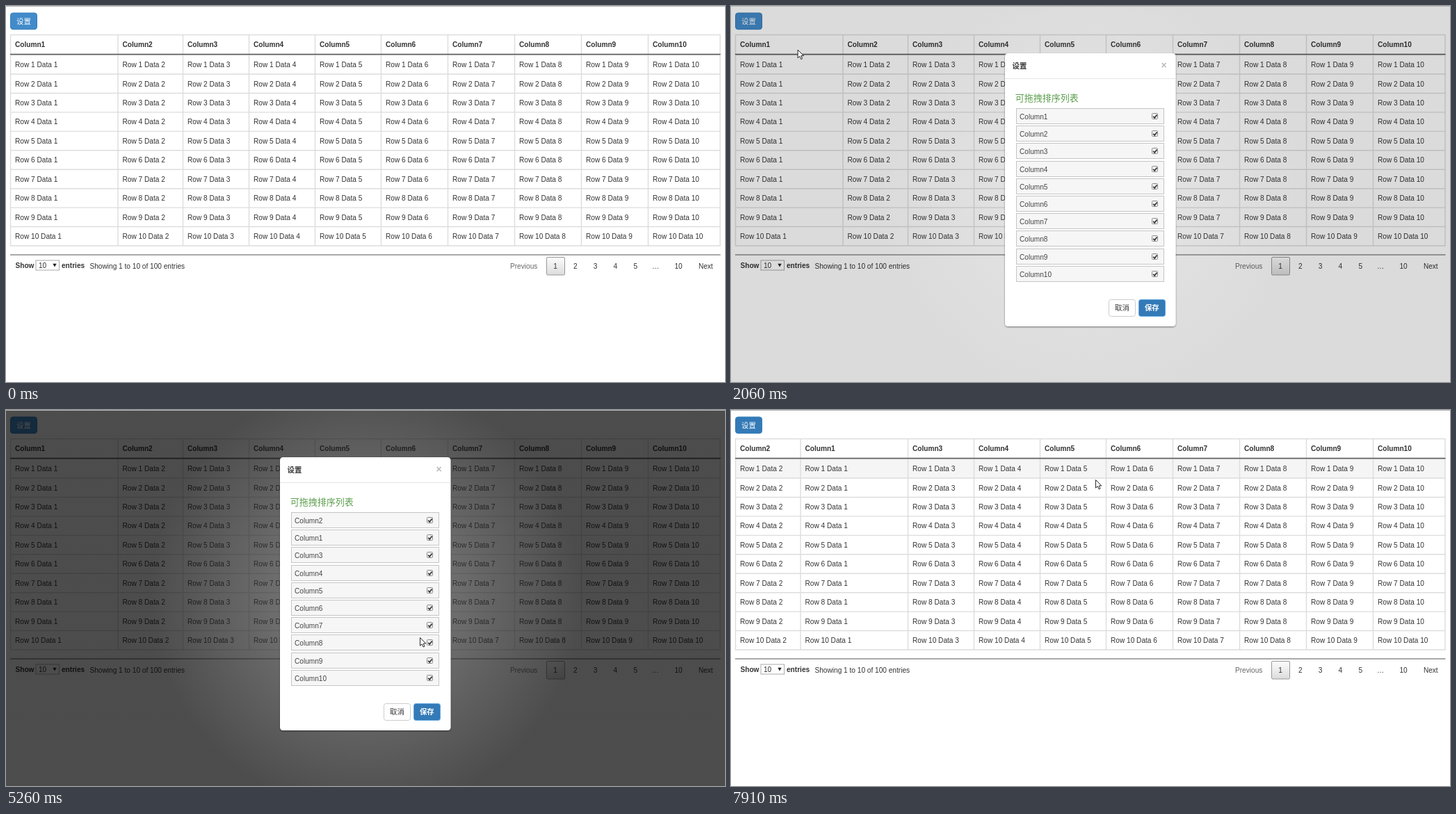
Write an HTML page that moves like this. It is 1034x541 px and loops after 7990 ms.

```html
<!DOCTYPE html>
<html lang="zh">
<head>
<meta charset="utf-8">
<title>Column settings</title>
<style>
html, body { margin: 0; width: 100%; height: 100%; overflow: hidden; background: #fff; }
svg { display: block; width: 1034px; height: 541px; }
text { font: 10.12px "Liberation Sans", Arial, "Noto Sans CJK SC", "Noto Sans CJK", sans-serif; fill: #333; white-space: pre; }
.bold { font-weight: bold; }
.mid { text-anchor: middle; }
.white { fill: #fff; }
.han { font-size: 10.4px; }
.list { font-size: 13px; fill: #5b9e4d; }
.url { font: 11px "Open Sans", "Noto Sans CJK SC", "Noto Sans CJK", sans-serif; }
.small { font-size: 9.4px; }
</style>
</head>
<body>
<svg id="stage" viewBox="0 0 1034 541">
  <defs>
    <radialGradient id="glow" gradientUnits="userSpaceOnUse" cx="517" cy="268" r="310">
      <stop offset=".38" stop-color="rgb(50,50,50)" stop-opacity=".7"/>
      <stop offset="1" stop-color="#000" stop-opacity=".7"/>
    </radialGradient>
    <linearGradient id="pageFill" x2="0" y2="1">
      <stop stop-color="#fcfcfc"/><stop offset="1" stop-color="#dcdcdc"/>
    </linearGradient>
    <filter id="shadow" x="-10%" y="-10%" width="120%" height="125%">
      <feDropShadow dx="0" dy="1" stdDeviation="1.3" flood-opacity=".5"/>
    </filter>
  </defs>
</svg>
<script>
const LOOP = 7990, STEP = 78;
const COLUMNS = Array.from({ length: 10 }, (_, i) => i + 1);
const SWAPPED = [2, 1, ...COLUMNS.slice(2)];
const PITCH = 25.2, ROW = 27.44, LEFT = 6.5, RIGHT = 1027;
const stage = document.getElementById('stage');

// Pointer moves: start, end, x, y
const ENTRY = [811, 539];
const MOVES = [
  [270, 582, 84, 178], [820, 820, 80, 64], [898, 1520, 41, 23],
  [2060, 2370, 314, 221], [2600, 2990, 543, 169], [3140, 3460, 502, 159],
  [3610, 4150, 487, 187], [4700, 5253, 595, 327], [5330, 5490, 588, 413],
  [5580, 5870, 601, 441], [6060, 6294, 615, 426], [6660, 7290, 645, 64],
  [7753, 7910, 524, 100]
];
const DRAG_START = 3610, DROP = 4530, GRAB_Y = 159, SAVED = 7820;

const text = (x, y, s, cls = '', extra = '') =>
  `<text x="${x}" y="${y}" class="${cls}" ${extra}>${s}</text>`;
const box = (x, y, w, h, fill, stroke = 'none', r = 0, extra = '') =>
  `<rect x="${x}" y="${y}" width="${w}" height="${h}" rx="${r}" fill="${fill}" stroke="${stroke}" ${extra}/>`;
const line = (x1, y1, x2, y2, color = '#ddd', w = 1.4) =>
  `<path d="M${x1} ${y1}L${x2} ${y2}" stroke="${color}" stroke-width="${w}"/>`;
const across = (y, color, w) => line(6, y, 1027.5, y, color, w);

function add(markup) {
  const g = document.createElementNS('http://www.w3.org/2000/svg', 'g');
  g.innerHTML = markup;
  stage.append(g);
  return g;
}
const show = (node, on) => { node.style.display = on ? '' : 'none'; };
const part = (g, cls) => g.querySelector('.' + cls);

const columnWidth = n => n === 1 ? 154.5 : n === 2 ? 93.5 : n < 6 ? 95 : 96;

function table(order) {
  let s = box(LEFT, 71, RIGHT - LEFT, 26.7, '#f5f5f5', 'none', 0, 'class="hover"') + across(41.5);
  for (let r = 0; r <= 10; r++) s += across(70.6 + r * ROW);
  let x = LEFT;
  for (const c of order) {
    s += line(x, 41, x, 345) + text(x + 6.5, 58.7, 'Column' + c, 'bold');
    for (let r = 1; r <= 10; r++) s += text(x + 6.5, 60.7 + r * ROW, `Row ${r} Data ${c}`);
    x += columnWidth(c);
  }
  return s + line(RIGHT, 41, RIGHT, 345) + across(69.5, '#555', 1.3);
}

function footer() {
  let s = across(358, '#555', 1.2);
  s += text(13.5, 376.6, 'Show', 'bold') + text(80, 376.6, 'entries', 'bold');
  s += box(43, 366, 33.5, 14, '#fff', '#a9a9a9') + text(47, 376.6, '10');
  s += '<path d="M67.3 370.8h5.4l-2.7 4.6z" fill="#222"/>';
  s += text(120.5, 377.6, 'Showing 1 to 10 of 100 entries');
  s += box(777.5, 361.5, 26, 25.5, 'url(#pageFill)', '#979797', 1.5);
  s += text(725, 378, 'Previous', '', 'style="fill:#666"');
  [1, 2, 3, 4, 5, '…'].forEach((label, i) => s += text(790 + i * 28.8, 378, label, 'mid'));
  return s + text(967, 378, '10', 'mid') + text(1006.3, 378, 'Next', 'mid');
}

function modal() {
  return box(394, 68, 245.5, 393, '#fff', 'none', 4.5, 'filter="url(#shadow)"') +
    text(404.5, 89.6, '设置', 'han bold') +
    text(622.5, 89.6, '×', 'mid bold', 'style="font-size:14px;fill:#bbb"') +
    line(394, 104.5, 639.5, 104.5, '#e5e5e5', 1) +
    text(408.8, 137, '可拖拽排序列表', 'list') +
    box(543.5, 422.5, 38, 24, '#fff', '#ccc', 3) + text(562.5, 438.2, '取消', 'mid han') +
    box(586.5, 422.5, 38, 24, '#337ab7', '#2e6da4', 3, 'class="save"') +
    text(605.3, 438.2, '保存', 'mid han white bold');
}

function item(n) {
  return box(410.5, 147.5, 212, 22, '#f6f6f6', '#c5c5c5') +
    text(415, 162.5, 'Column' + n, '', 'style="fill:#454545"') +
    box(605.5, 154.5, 8, 8, '#f0f0f0', '#8c8c8c', 1) +
    '<path d="M607.2 158.8l2 2.1 3.4-4.5" fill="none" stroke="#333" stroke-width="1.7"/>';
}

function alertBox() {
  return box(355, -6, 323, 98, '#fff', 'none', 1, 'filter="url(#shadow)"') +
    text(367, 22.2, 'ii418260957.github.io', 'url') + text(482, 22.2, '显示', 'url') +
    text(366.3, 41.6, '保存成功', 'small', 'style="fill:#555"') +
    box(620, 56.5, 47, 24, '#4285f4', 'none', 2) +
    text(643.7, 72, '确定', 'mid small white');
}

const before = add(table(COLUMNS));
const after = add(table(SWAPPED));
show(part(before, 'hover'), false);
add(footer());
const settings = add(box(6.5, 10, 38, 23.6, '#428bca', '#357ebd', 3.5, 'class="fill"') +
  text(25.5, 25.6, '设置', 'mid han white'));
const shade = add(box(0, 1, 1034, 540, 'url(#glow)'));
add(line(0, .5, 1034, .5, '#b5b5b5', 1));
const dialog = add(modal());
const items = COLUMNS.map(n => add(item(n)));
dialog.append(...items.slice().reverse());
const prompt = add(alertBox());
const arrow = add('<path d="M.5 .5V12.2L3.2 9.7 5.1 13.9 7 13.1 5.2 9H8.8Z" fill="#fff" stroke="#111" stroke-width=".9"/>');
const hand = add('<path d="M2.6 10V1.6Q2.6.5 3.7.5T4.8 1.6V6Q6.6 5 7 6.5 8.6 5.7 9 7.2 10.8 6.6 10.8 8.4V11.5L9.6 15.3H3.8L.6 10.7Q-.6 8.8.8 8.5Z" fill="#fff" stroke="#111" stroke-width=".9"/>');

const ramp = (t, from, to) => Math.min(1, Math.max(0, (t - from) / (to - from)));
const swing = p => (1 - Math.cos(Math.PI * p)) / 2;

// Each move advances in equal steps and then rests
function pointerAt(t) {
  let [x, y] = ENTRY;
  for (const [start, end, toX, toY] of MOVES) {
    if (t < start) break;
    const steps = Math.round((end - start) / STEP) + 1;
    const p = Math.min(1, (Math.floor((t - start) / STEP) + 1) / steps);
    x += (toX - x) * p;
    y += (toY - y) * p;
  }
  return [x, y];
}

function placeItems(t, y) {
  const drag = t < DRAG_START ? 0 : t < DROP ? y - GRAB_Y : PITCH;
  items.forEach((g, i) => {
    const dy = i === 0 ? drag : i === 1 && drag > PITCH / 2 ? 0 : i * PITCH;
    g.setAttribute('transform', `translate(0 ${Math.round(dy)})`);
  });
}

function placePrompt(t) {
  const level = ramp(t, 6285, 6510) - ramp(t, 7518, 7830);
  const grow = 1 + (1 - level) * .012;
  show(prompt, level > 0);
  prompt.style.opacity = level;
  prompt.setAttribute('transform', `translate(${516.5 * (1 - grow)} ${(level - 1) * 17}) scale(${grow} 1)`);
}

function draw(t) {
  const [x, y] = pointerAt(t);
  const saved = t >= SAVED;
  show(before, !saved);
  show(after, saved);
  show(part(after, 'hover'), t > 7900);
  part(settings, 'fill').setAttribute('fill', saved ? '#337ab7' : '#428bca');

  shade.style.opacity = swing(ramp(t, 1930, 2370)) * (1 - ramp(t, 7753, 7910));
  show(dialog, t >= 1900 && !saved);
  placeItems(t, y);
  placePrompt(t);

  const pointing = t >= 5700 && t < 6740;
  const save = part(dialog, 'save');
  save.setAttribute('fill', pointing && t > 6060 ? '#2e71ab' : '#337ab7');
  save.setAttribute('stroke', t < 6060 ? '#5ea6e0' : '#2e6da4');

  const visible = t >= 270 && !(t >= 660 && t < 820);
  show(arrow, visible && !pointing);
  show(hand, visible && pointing);
  arrow.setAttribute('transform', `translate(${x} ${y})`);
  hand.setAttribute('transform', `translate(${x - 2} ${y - .5})`);
}

function tick() {
  draw(performance.now() % LOOP);
  requestAnimationFrame(tick);
}
tick();
</script>
</body>
</html>
```
